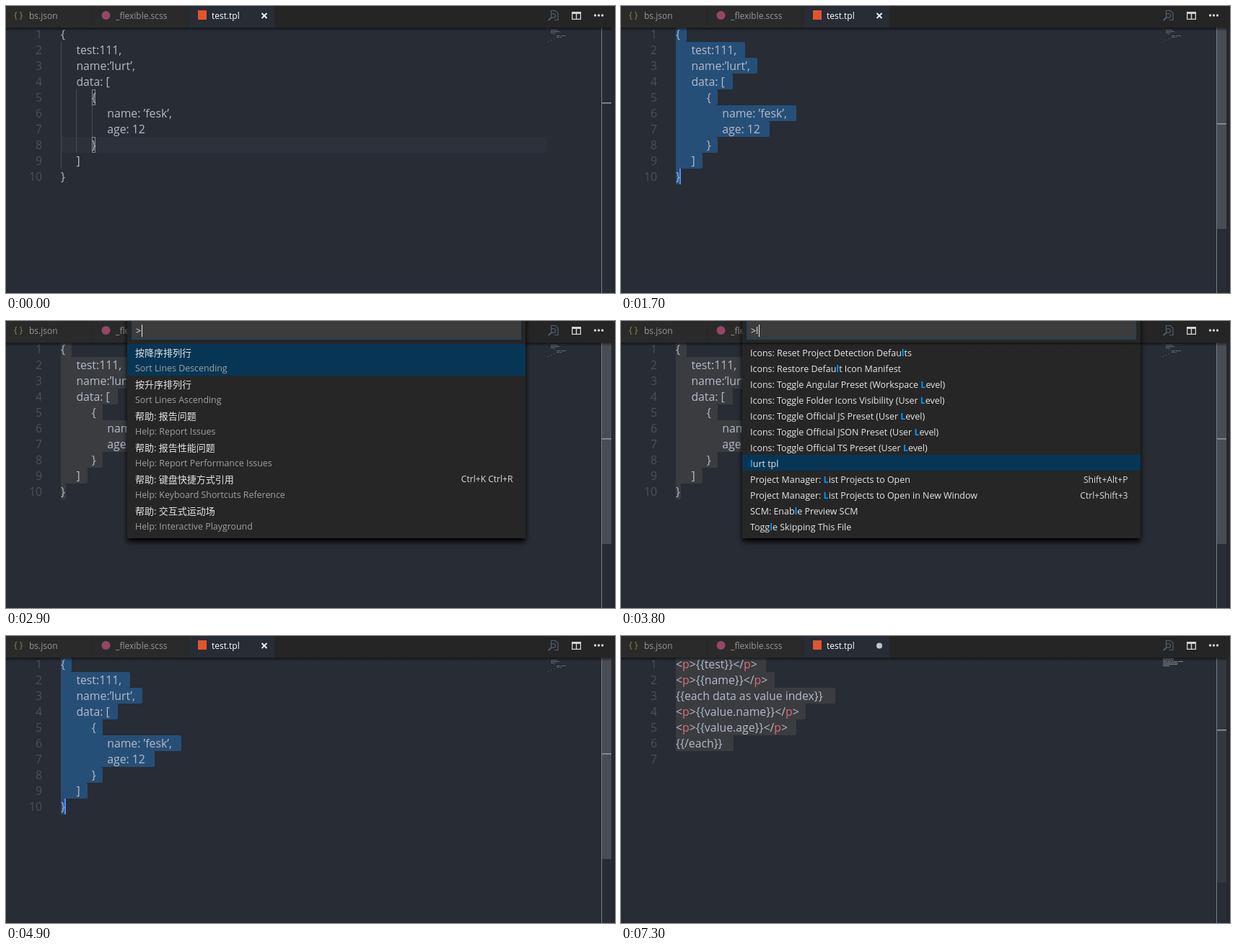
An HTML page for the animation above (7400 ms loop, 844x399 px).

```html
<!DOCTYPE html>
<html lang="en">
<head>
<meta charset="utf-8">
<title>Template editor</title>
<style>
  html, body { margin: 0; width: 100%; height: 100%; overflow: hidden; background: #282c34; }
  svg { display: block; width: 100%; height: 100%; }
  text { font-family: 'Open Sans', 'Noto Sans CJK SC', 'Noto Sans CJK', sans-serif; }
  .code { font-size: 15.8px; fill: #b4bac6; }
  .num { font-size: 15.8px; fill: #495060; text-anchor: end; }
  .tab { font-size: 12px; fill: #979797; }
  .ui { font-size: 12.45px; fill: #e6e6e6; }
  .cjk { font-size: 13px; fill: #e6e6e6; }
  .sub { font-size: 12.4px; fill: #a0a0a0; }
  .key { font-size: 12.1px; fill: #dcdcdc; text-anchor: end; }
  .hit { fill: #0097fb; font-weight: 700; }
  .tag { fill: #e06c75; }
</style>
</head>
<body>
<svg id="stage" viewBox="0 0 844 399" xmlns="http://www.w3.org/2000/svg">
  <defs>
    <linearGradient id="fade" x1="0" y1="0" x2="0" y2="1">
      <stop offset="0" stop-color="#000" stop-opacity=".5"/>
      <stop offset="1" stop-color="#000" stop-opacity="0"/>
    </linearGradient>
    <filter id="shadow" x="-5%" y="-20%" width="110%" height="150%">
      <feDropShadow dx="0" dy="5" stdDeviation="3.5" flood-color="#000"/>
    </filter>
    <clipPath id="body"><rect y="30" width="844" height="369"/></clipPath>
  </defs>
  <rect width="844" height="399" fill="#282c34"/>
  <g id="editor" clip-path="url(#body)"></g>
  <g id="header"></g>
  <g id="palette"></g>
</svg>
<script>
const LOOP = 7400, TOP = 28, ROW = 22, LEFT = 76, INDENT = 21.4;
const $ = id => document.getElementById(id);
const esc = s => s.replace(/&/g, '&amp;').replace(/</g, '&lt;').replace(/>/g, '&gt;');
const rect = (x, y, w, h, fill, extra = '') =>
  `<rect x="${x}" y="${y}" width="${w}" height="${h}" fill="${fill}" ${extra}/>`;
const text = (cls, x, y, body, extra = '') =>
  `<text class="${cls}" x="${x}" y="${y}" ${extra}>${body}</text>`;
const rowTop = i => TOP + ROW * i;

// Each line: indent depth, text, right edge of its selection
const DATA = {
  lines: [
    [0, '{', 91], [1, 'test:111,', 172], [1, 'name:’lurt’,', 189], [1, 'data: [', 155],
    [2, '{', 134], [3, 'name: ’fesk’,', 243], [3, 'age: 12', 206], [2, '}', 134],
    [1, ']', 113], [0, '}', 83]
  ],
  caret: [81, 9], mark: 163, thumb: 280, ink: '#7c828c'
};
const TEMPLATE = {
  lines: [
    [0, '<p>{{test}}</p>', 201], [0, '<p>{{name}}</p>', 213],
    [0, '{{each data as value index}}', 297], [0, '<p>{{value.name}}</p>', 256],
    [0, '<p>{{value.age}}</p>', 243], [0, '{{/each}}', 156], [0, '', 0]
  ],
  caret: [76, 6], mark: 130, thumb: 313, ink: '#a2a6ad'
};

const HELP = [
  ['按降序排列行', 'Sort Lines Descending'],
  ['按升序排列行', 'Sort Lines Ascending'],
  ['帮助: 报告问题', 'Help: Report Issues'],
  ['帮助: 报告性能问题', 'Help: Report Performance Issues'],
  ['帮助: 键盘快捷方式引用', 'Help: Keyboard Shortcuts Reference', 'Ctrl+K Ctrl+R'],
  ['帮助: 交互式运动场', 'Help: Interactive Playground']
];
const WIDE = [
  ['Icons: Reset Project Detection Defaults'],
  ['Icons: Restore Default Icon Manifest'],
  ['Icons: Toggle Angular Preset (Workspace Level)'],
  ['Icons: Toggle Folder Icons Visibility (User Level)'],
  ['Icons: Toggle Official JS Preset (User Level)'],
  ['Icons: Toggle Official JSON Preset (User Level)'],
  ['Icons: Toggle Official TS Preset (User Level)'],
  ['lurt tpl'],
  ['Project Manager: List Projects to Open', 'Shift+Alt+P'],
  ['Project Manager: List Projects to Open in New Window', 'Ctrl+Shift+3'],
  ['SCM: Enable Preview SCM'],
  ['Toggle Skipping This File']
];
const NARROW = [
  ...['Down', 'Left', 'Page Down', 'Page Up', 'Right', 'Up'].map(d => ['Cursor Column Select ' + d]),
  ['Emmet: Evaluate Math Expression'],
  ['lurt tpl'],
  ['View: Single Column Editor Layout'],
  ['View: Three Columns Editor Layout'],
  ['View: Two Columns Editor Layout'],
  ['View: Two Columns Right Editor Layout']
];
const ONLY = [['lurt tpl']];

function minimap(doc) {
  let out = '';
  doc.lines.forEach(([depth, str], i) => {
    for (const m of str.matchAll(/\S+/g))
      out += rect(751 + depth * 4 + m.index, 31 + 2 * i, m[0].length, 1, doc.ink, 'opacity=".7"');
  });
  return out;
}

function guides() {
  return [[0, 1, 9], [1, 4, 8], [2, 5, 7]].map(([d, a, b]) =>
    rect(Math.round(LEFT + d * INDENT), rowTop(a), 1, (b - a) * ROW, '#474c55')).join('');
}

function drawEditor(s) {
  const doc = s.doc;
  let out = '';
  if (s.select) {
    const fill = s.select === 'on' ? '#264f78' : '#3a3c40';
    doc.lines.forEach(([, , right], i) => {
      if (right) out += rect(LEFT, rowTop(i), right - LEFT, ROW, fill, 'rx="2.5"') +
        rect(LEFT, rowTop(i), 4, ROW, fill);
    });
  } else {
    out += rect(LEFT, rowTop(7), 674, ROW, '#2c313c') + guides();
    for (const i of [4, 7])
      out += rect(119.5, rowTop(i) + .5, 4, ROW - 1, 'none', 'stroke="#868a91"');
  }
  doc.lines.forEach(([depth, str], i) => {
    const y = rowTop(i) + 17;
    const body = esc(str).replace(/(&lt;\/?)p/g, '$1<tspan class="tag">p</tspan>');
    out += text('num', 50, y, i + 1) + text('code', LEFT + depth * INDENT, y, body);
  });
  if (s.caret) out += rect(doc.caret[0], rowTop(doc.caret[1]), 2, ROW, '#528bff');
  if (s.lens) out += rect(750, 30, 75, 38, '#343a45');
  out += minimap(doc);
  out += rect(826, 30, 13, doc.thumb, '#494c52', `opacity="${s.thumb}"`);
  out += rect(825, 30, 1, 369, '#777b82') +
    rect(826, s.oldMark ? 134 : doc.mark, 13, 1.6, '#90939a') +
    rect(839, 30, 5, 369, '#25282e') +
    rect(0, 30, 839, 5, 'url(#fade)');
  $('editor').innerHTML = out;
}

function drawHeader(s) {
  const dirty = s.doc === TEMPLATE;
  $('header').innerHTML =
    rect(0, 0, 844, 30, '#252526') +
    rect(0, 0, 119, 30, '#2a2a2b') + rect(120, 0, 132, 30, '#2a2a2b') +
    rect(253, 0, 119, 30, '#282c34') +
    text('tab', 11, 17, '{ }', 'style="fill:#8d8440"') + text('tab', 32, 18, 'bs.json') +
    '<circle cx="138.5" cy="13" r="6" fill="#934766"/>' + text('tab', 152, 18, '_flexible.scss') +
    rect(266, 6, 12, 13, '#e5532d') + text('tab', 285, 18, 'test.tpl', 'style="fill:#fff"') +
    (dirty
      ? '<circle cx="358" cy="13.5" r="4" fill="#c5c5c5"/>'
      : '<path d="M354.5 10l7 7m0-7l-7 7" stroke="#eee" stroke-width="2"/>') +
    '<g fill="none" stroke="#50606f" stroke-width="1.2">' +
    '<path d="M755.5 12V6.500h6l3.500 3.500v9.500h-5"/><circle cx="758.500" cy="13.500" r="3"/>' +
    '<path d="M756 16l-4.500 4" stroke-width="1.800"/></g>' +
    '<path d="M784 8h13v11h-13zM785.300 11v6.700h4.500V11zM791.200 11v6.700h4.500V11z" fill="#d4d4d4" fill-rule="evenodd"/>' +
    [816.5, 821.5, 826.5].map(x => `<circle cx="${x}" cy="13" r="1.700" fill="#d4d4d4"/>`).join('');
}

function mark(str, q) {
  const m = new RegExp('\\b' + q, 'i').exec(str) || new RegExp(q, 'i').exec(str);
  if (!m) return esc(str);
  const end = m.index + q.length;
  return esc(str.slice(0, m.index)) + `<tspan class="hit">${m[0]}</tspan>` + esc(str.slice(end));
}

function drawPalette(s) {
  const box = $('palette');
  if (!s.list) { box.innerHTML = ''; return; }
  const help = s.list === HELP, pitch = help ? 44 : ROW;
  let out = rect(168, -20, 552, 58 + s.list.length * pitch, '#252526', 'filter="url(#shadow)"') +
    rect(174.5, -4, 539, 29.5, '#3c3c3c', 'stroke="#10486b"');
  s.list.forEach((item, i) => {
    const y = 32 + i * pitch, base = y + 16.5;
    if (help ? i === 0 : item[0] === 'lurt tpl') out += rect(168, y, 552, pitch, '#073655');
    if (help) {
      out += text('cjk', 179, base, item[0]) + text('sub', 179, base + 21.5, item[1]);
      if (item[2]) out += text('key', 702.5, base - .5, item[2]);
    } else {
      out += text('ui', 179, base, mark(item[0], s.query));
      if (item[1]) out += text('key', 702.5, base, item[1]);
    }
  });
  if (!help && s.list !== ONLY) out += rect(168, 30, 552, 4, 'url(#fade)');
  out += text('ui', 180, 18, '&gt;' + s.query, 'id="query"');
  box.innerHTML = out;
  if (!s.hideBar) {
    const x = Math.round(180.5 + $('query').getComputedTextLength());
    box.insertAdjacentHTML('beforeend', rect(x, 5, 1, 17, '#e8e8e8'));
  }
}

// Blinking caret: visible first, toggled at every listed time
const blink = (t, times) => times.filter(x => t >= x).length % 2 === 0;

function stateAt(t) {
  const s = { doc: t < 5000 ? DATA : TEMPLATE, query: '' };
  s.thumb = t < 100 ? 0 : t < 7000 ? 1 : .35;
  s.oldMark = t < 900;
  if (t < 800) return s;
  s.select = 'on';
  if (t < 2900) s.caret = blink(t, [1300, 1700, 2100, 2600]);
  else if (t < 4900) {
    s.select = 'off';
    s.list = t < 3800 ? HELP : t < 4000 ? WIDE : t < 4200 ? NARROW : ONLY;
    s.query = t < 3700 ? '' : t < 4000 ? 'l' : t < 4200 ? 'lu' : 'lurt';
    s.hideBar = t >= 3200 && t < 3700;
  } else if (t < 7300) {
    s.caret = blink(t, [5500, 5900, 6400, 6800]);
    s.lens = t >= 6800 && t < 7000;
  } else s.select = 'off';
  return s;
}

let last = '';
function draw(t) {
  const s = stateAt(t), key = JSON.stringify(s);
  if (key === last) return;
  last = key;
  drawEditor(s);
  drawHeader(s);
  drawPalette(s);
}

const start = performance.now();
function tick() {
  draw((performance.now() - start) % LOOP);
  requestAnimationFrame(tick);
}
tick();
</script>
</body>
</html>
```
